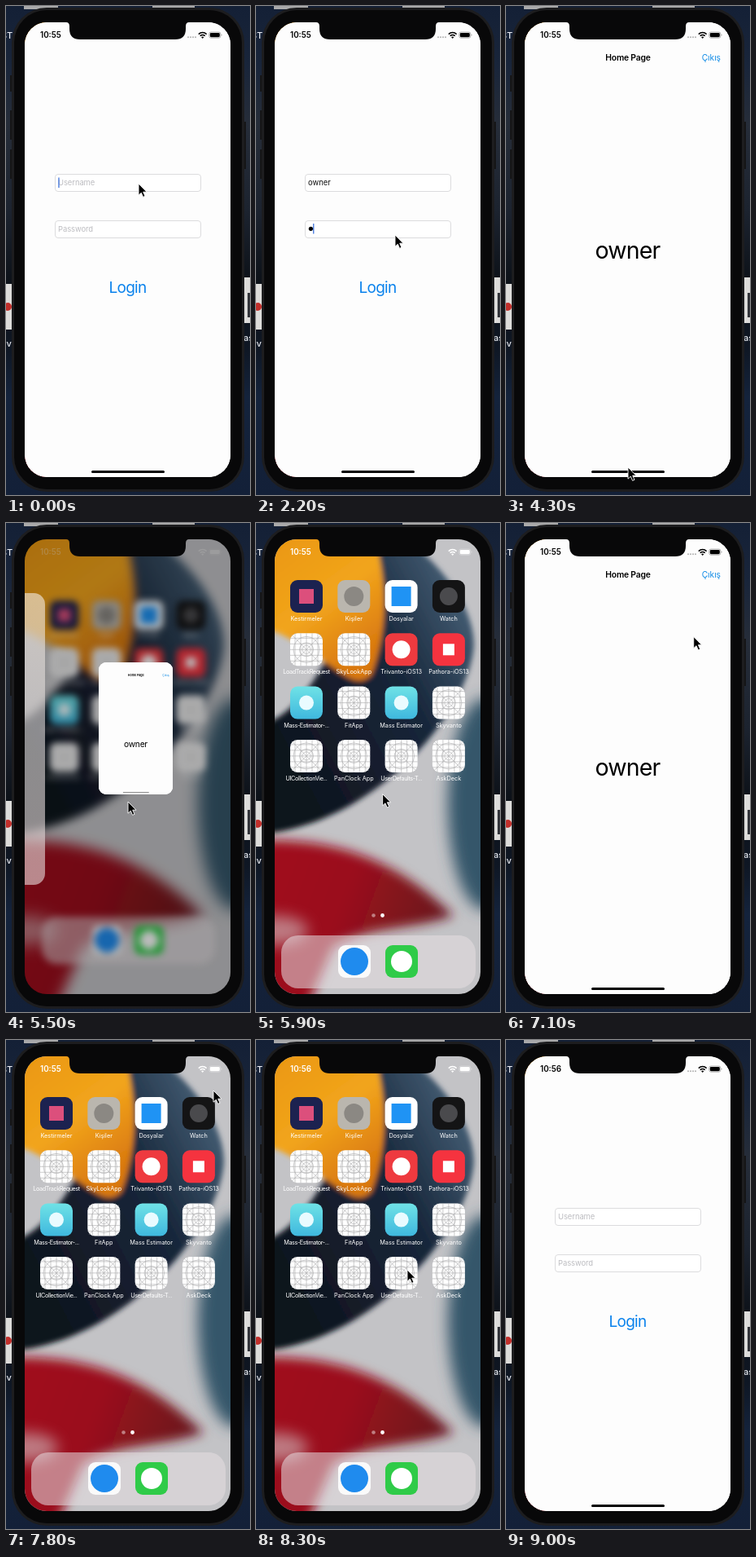
Animation, 300 px wide and 600 px high, one loop 9.5 s. Source, as an HTML page:

```html
<!DOCTYPE html>
<html lang="en">
<head>
<meta charset="utf-8">
<title>Login demo</title>
<style>
  html, body { margin: 0; width: 100%; height: 100%; overflow: hidden; background: #131d30; }
  #stage { position: relative; width: 300px; height: 600px; overflow: hidden; }
  #stage svg { position: absolute; left: 0; top: 0; display: block; }
  #screen { position: absolute; inset: 0; clip-path: inset(20px 24px 22px 23px round 27px); background: #000; }
  #icons { transform-origin: 150px 300px; }
  #dim { position: absolute; inset: 0; background: #000; }
  #prev { position: absolute; top: 86px; width: 164px; height: 358px; border-radius: 14px;
    background: linear-gradient(#f1e9e1, #dcd8d8 45%, #e4d6d6); }
  #app { position: absolute; overflow: hidden; background: #fdfdfd; }
  #app svg { width: 100%; }
  #bar { position: absolute; left: 50%; transform: translateX(-50%); border-radius: 9px; }
  text { font-family: Inter, "Open Sans", sans-serif; white-space: pre; }
  .clock { font-size: 9.8px; font-weight: 600; }
  .label { font-size: 7.3px; fill: #fff; text-anchor: middle; }
  .field { fill: #fff; stroke: #dcdcde; }
  .hint { font-size: 9.45px; fill: #bdbdc1; letter-spacing: -.08px; }
  .typed { font-size: 9.45px; fill: #111; }
  .caret { fill: #3f74dc; }
  .desk { font-size: 11px; font-weight: 500; fill: #e8eaf0; }
</style>
</head>
<body>
<div id="stage">
  <svg id="desk" width="300" height="600">
    <defs>
      <linearGradient id="night" x2="0" y2="1">
        <stop offset="0" stop-color="#142036"/><stop offset=".12" stop-color="#19253a"/>
        <stop offset=".24" stop-color="#262d39"/><stop offset=".42" stop-color="#1c232f"/>
        <stop offset=".56" stop-color="#0d1219"/><stop offset=".7" stop-color="#0f1724"/>
        <stop offset=".8" stop-color="#14233c"/><stop offset="1" stop-color="#132038"/>
      </linearGradient>
    </defs>
    <rect width="300" height="600" fill="url(#night)"/>
    <path d="M22 0h42v4h-42zM180 0h52v4h-52z" fill="#a9a9aa"/>
    <path d="M0 341h8v56h-8zM292 333h8v56h-8z" fill="#dddcda"/>
    <circle cx="2" cy="369" r="5" fill="#c22f2b"/>
    <rect x="297" y="352" width="4" height="30" fill="#33353a"/>
    <text class="desk" x="-6" y="40">ST</text>
    <text class="desk" x="-6" y="418">ov</text>
    <text class="desk" x="292" y="411">as</text>
    <path d="M5 85h4v20h-4zM5 128h4v36h-4zM5 176h4v36h-4zM291 142h4v58h-4z" fill="#151516"/>
    <rect x="7" y="2" width="286" height="594" rx="43" fill="#1d1d1f"/>
    <rect x="10" y="5" width="280" height="588" rx="40" fill="#080809"/>
  </svg>

  <div id="screen">
    <svg id="wall" width="300" height="600">
      <defs>
        <linearGradient id="sun" x2=".6" y2="1">
          <stop offset="0" stop-color="#e8930c"/><stop offset=".6" stop-color="#f2a51c"/><stop offset="1" stop-color="#d9780f"/>
        </linearGradient>
        <linearGradient id="navy" x1=".2" y1=".8" x2="1" y2=".2">
          <stop offset="0" stop-color="#10151f"/><stop offset=".55" stop-color="#17263a"/><stop offset="1" stop-color="#4a657c"/>
        </linearGradient>
        <linearGradient id="red" x2="1" y2=".3">
          <stop offset="0" stop-color="#a30f1b"/><stop offset=".55" stop-color="#9a101c"/><stop offset="1" stop-color="#6a1620"/>
        </linearGradient>
        <linearGradient id="tile" x2="0" y2="1">
          <stop offset="0" stop-color="#6fe2e6"/><stop offset="1" stop-color="#3fb8de"/>
        </linearGradient>
        <filter id="soft" x="-60%" y="-50%" width="220%" height="200%"><feGaussianBlur stdDeviation="9"/></filter>
        <filter id="edge"><feGaussianBlur stdDeviation="3"/></filter>
        <filter id="haze"><feGaussianBlur stdDeviation="7"/></filter>
      </defs>
      <rect x="-30" y="-30" width="360" height="660" fill="#c3c3c6"/>
      <ellipse cx="282" cy="345" rx="46" ry="130" fill="#36566a" filter="url(#soft)"/>
      <g filter="url(#edge)">
        <path d="M0 250C70 235 125 110 135 0H150C205 25 268 90 268 150C262 235 140 375 0 382Z" fill="url(#navy)"/>
        <path d="M0 0H140C162 60 164 130 142 186C115 215 85 150 0 125Z" fill="url(#sun)"/>
      </g>
      <path d="M-20 391C90 382 170 410 243 482C190 500 140 494 95 520L60 600H-20Z" fill="url(#red)" filter="url(#haze)"/>
      <ellipse cx="24" cy="500" rx="40" ry="18" fill="#d3c3c6" opacity=".6" filter="url(#soft)"/>
    </svg>
    <svg id="icons" width="300" height="600"></svg>
    <svg id="homeStatus" width="300" height="600"></svg>
    <div id="dim"></div>
    <div id="prev"></div>
    <div id="app">
      <svg id="login" viewBox="23 20 253 558"></svg>
      <svg id="page" viewBox="23 20 253 558"></svg>
      <svg id="appStatus" viewBox="23 20 253 558"></svg>
      <div id="bar"></div>
    </div>
  </div>

  <svg width="300" height="600">
    <path d="M74 18V20Q78 20 78 25V28Q78 41 91 41H208Q221 41 221 28V25Q221 20 225 20V18Z" fill="#080809"/>
    <path id="cursor" d="M0 0V14.2L3.3 11.2L5.6 16.4L8 15.3L5.7 10.2H10Z" fill="#000" stroke="#fff" stroke-width=".9"/>
  </svg>
</div>

<script>
const LOOP = 9500, STEP = 100, USER = 'owner';
const $ = id => document.getElementById(id);
const clamp = v => Math.min(1, Math.max(0, v));
const mix = (a, b, p) => a + (b - a) * p;
const smooth = u => u * u * (3 - 2 * u);
const easeOut = u => 1 - (1 - u) ** 3;
const span = (t, from, ms) => clamp((t - from) / ms);

// Values of a track of [ms, ...values] rows at time t.
function track(rows, t, ease = u => u) {
  const i = rows.findIndex(r => r[0] > t);
  if (i < 0) return rows.at(-1).slice(1);
  if (i === 0) return rows[0].slice(1);
  const [a, b] = [rows[i - 1], rows[i]];
  const u = ease((t - a[0]) / (b[0] - a[0]));
  return a.slice(1).map((v, k) => mix(v, b[k + 1], u));
}

// --- Static drawing ---

const status = (color, dots) => `<g fill="${color}">
  <text class="clock" x="42" y="39.4"></text>
  ${dots ? [224, 227, 230, 233].map(x => `<circle cx="${x}" cy="38.3" r="1" opacity=".3"/>`).join('') : ''}
  <g fill="none" stroke="${color}" stroke-width="1.5">
    <path d="M236.8 34.6a7 7 0 0 1 9.8 0M238.7 36.8a4.3 4.3 0 0 1 6 0"/>
  </g>
  <path d="M241.7 40l-1.6-1.8a2.3 2.3 0 0 1 3.2 0z"/>
  <rect x="249.8" y="32" width="14" height="7.2" rx="2.2" fill="none" stroke="${color}" stroke-width=".6" opacity=".5"/>
  <rect x="250.8" y="33" width="12" height="5.2" rx="1.4"/>
  <path d="M264.8 34.3q1.3 1.3 0 2.6z" opacity=".6"/></g>`;

function blueprint() {
  const lines = [6, 13, 20, 27, 34].map(k => `M${k} 0V40M0 ${k}H40`).join('');
  const rings = [5, 8.5, 16].map(r => `<circle cx="20" cy="20" r="${r}"/>`).join('');
  return `<g fill="none" stroke="#a8a8aa" stroke-width=".6"><path d="${lines}M2 2L38 38M38 2L2 38"/>${rings}</g>`;
}

const dot = (color, r) => `<circle cx="20" cy="20" r="${r}" fill="${color}"/>`;
const box = (color, s) => `<rect x="${20 - s / 2}" y="${20 - s / 2}" width="${s}" height="${s}" fill="${color}"/>`;
const icon = (cx, cy, tile, art, label = '') => `<g transform="translate(${cx - 20} ${cy - 20})">
  <rect width="40" height="40" rx="9" fill="${tile}"/>${art}
  <text class="label" x="20" y="50" letter-spacing="${label.length > 14 ? -.45 : 0}">${label}</text></g>`;

const grid = blueprint();
const apps = [
  ['Kestirmeler', '#1c2250', box('#dc4f7c', 18)],
  ['Kişiler', '#bab6ae', dot('#8b8883', 12)],
  ['Dosyalar', '#fff', box('#1f93f4', 24)],
  ['Watch', '#141415', dot('#4a4a4d', 11)],
  ['LoadTrackRequest', '#fff', grid],
  ['SkyLookApp', '#fff', grid],
  ['Trivanto-iOS13', '#ee3a3f', dot('#fff', 11)],
  ['Pathora-iOS13', '#f5333f', box('#fff', 14)],
  ['Mass-Estimator-...', 'url(#tile)', dot('#e9fbff', 9)],
  ['FitApp', '#fff', grid],
  ['Mass Estimator', 'url(#tile)', dot('#e9fbff', 9)],
  ['Skyvanto', '#fff', grid],
  ['UICollectionVie...', '#fff', grid],
  ['PanClock App', '#fff', grid],
  ['UserDefaults-T...', '#fff', grid],
  ['AskDeck', '#fff', grid],
];

$('icons').innerHTML =
  apps.map(([label, tile, art], i) =>
    icon(62 + 58.3 * (i % 4), 90 + 65.3 * (i >> 2), tile, art, label)).join('') +
  `<g id="pager" fill="#fff"><circle cx="144.5" cy="481.5" r="2.3" opacity=".45"/><circle cx="155.5" cy="481.5" r="2.4"/></g>
   <rect x="31" y="506" width="239" height="65" rx="21" fill="#e6dfe2" opacity=".55"/>` +
  icon(121, 538, '#fafafa', dot('#1f8bee', 17)) +
  icon(179, 538, '#2fcb48', dot('#fff', 13));

$('homeStatus').innerHTML = status('#fff', false);
$('appStatus').innerHTML = status('#000', true);

$('login').innerHTML = `<rect x="23" y="20" width="253" height="558" fill="#fdfdfd"/>
  <rect class="field" x="60.5" y="206.5" width="179" height="21" rx="3.5"/>
  <rect class="field" x="60.5" y="263.5" width="179" height="21" rx="3.5"/>
  <text class="hint" id="userHint" x="64" y="220.4">Username</text>
  <text class="hint" id="passHint" x="64" y="277.2">Password</text>
  <text class="typed" id="user" x="64" y="220.4"></text>
  <g id="dots">${[0, 1, 2, 3, 4].map(i => `<circle cx="${67.4 + 5.8 * i}" cy="273.3" r="2.6"/>`).join('')}</g>
  <rect class="caret" id="caret" width="1.3" height="12.5"/>
  <text id="button" x="149.5" y="352.3" font-size="19" letter-spacing="-.75" text-anchor="middle" fill="#0a82ec">Login</text>`;

$('page').innerHTML = `<rect x="23" y="20" width="253" height="558" fill="#fdfdfd"/>
  <text x="150" y="67.4" font-size="10.3" font-weight="600" letter-spacing="-.18" text-anchor="middle">Home Page</text>
  <text x="264" y="67.4" font-size="10.2" text-anchor="end" fill="#0f8be6">Çıkış</text>
  <text x="149.5" y="309.5" font-size="28.5" letter-spacing="-.8" text-anchor="middle">${USER}</text>`;

const clocks = document.querySelectorAll('.clock');
const dots = [...$('dots').children];

// --- Motion ---

const pointer = [
  [1200, 163, 218], [1700, 171, 281], [2800, 171, 281], [3200, 148, 344], [3800, 148, 344],
  [4300, 150, 566], [4900, 150, 566], [5400, 150, 342], [5800, 150, 342], [6200, 186, 282],
  [6800, 186, 282], [7300, 255, 62], [7800, 255, 62], [8200, 186, 282],
];
// Card while swiped away: centre x, centre y, width, height
const swipe = [
  [4900, 149.5, 299, 253, 558], [5100, 150, 268, 200, 440], [5300, 152, 214, 143, 312],
  [5400, 155, 228, 115, 222], [5500, 159.5, 252, 91, 162], [5600, 171, 275, 62, 88],
  [5700, 178, 285, 44, 46], [5800, 179, 286, 40, 40],
];
// Backdrop while swiping: blur, scale, shade, status opacity
const backdrop = [[4900, 8, .84, .42, 0], [5400, 5.5, .88, .31, .2], [5500, 4.8, .89, .27, .3], [5800, 0, 1, 0, 1]];
// Neighbour card: right edge, opacity
const neighbour = [[5000, 10, .9], [5350, 48, .9], [5500, 48, .62], [5700, 40, 0]];
const userKeys = [400, 600, 700, 900, 1100], passKeys = [2100, 2400, 2500, 2600, 2800];

const fromIcon = p => [mix(179, 149.5, p), mix(286, 299, p), mix(40, 253, p), 40 + 518 * p ** 1.4];

// How far the app is open: 0 is its icon, 1 is full screen
function openness(t) {
  if (t < 6300) return t < 5800 ? 1 : 0;
  if (t < 7400) return easeOut(span(t, 6300, 400));
  if (t < 8300) return 1 - easeOut(span(t, 7400, 400));
  return easeOut(span(t, 8300, 400));
}

function drawForm(t) {
  const fresh = t >= 8300;
  const count = keys => fresh ? 0 : keys.filter(k => t >= k).length;
  const letters = count(userKeys), secret = count(passKeys);
  $('user').textContent = USER.slice(0, letters);
  $('userHint').style.opacity = letters ? 0 : 1;
  $('passHint').style.opacity = secret ? 0 : 1;
  dots.forEach((d, i) => d.style.opacity = i < secret ? 1 : 0);
  const inPass = t >= 1700;
  const typed = letters ? $('user').getComputedTextLength() : 0;
  $('caret').setAttribute('x', 64.3 + (inPass ? 5.8 * secret : typed));
  $('caret').setAttribute('y', inPass ? 267 : 210.5);
  $('caret').style.opacity = fresh ? 0 : 1;
  $('button').style.opacity = t >= 3300 && t < 3400 ? .35 : 1;
}

function drawApp(t, swiping) {
  const p = openness(t);
  const [cx, cy, w, h] = swiping ? track(swipe, t) : fromIcon(p);
  const s = w / 253, grow = (w - 40) / 213, full = s > .995;
  Object.assign($('app').style, {
    left: cx - w / 2 + 'px', top: cy - h / 2 + 'px', width: w + 'px', height: h + 'px',
    borderRadius: mix(4, 27, grow) + 'px', opacity: clamp(grow * 7),
  });
  Object.assign($('bar').style, {
    width: 90 * s + 'px', height: 3 * s + 'px', bottom: 5.5 * s + 'px', background: full ? '#000' : '#8c8c8c',
  });
  $('appStatus').style.opacity = swiping ? clamp(1 - (t - 4900) / 300) : 1;
  const rise = 558 * (1 - easeOut(span(t, 3300, 500)));
  $('page').style.display = t >= 3400 && t < 8300 ? '' : 'none';
  $('page').style.transform = `translateY(${rise}px)`;
  return p;
}

function drawHome(t, swiping, p) {
  const [blur, scale, shade, bright] = swiping
    ? track(backdrop, t) : [3.6 * p, 1 - .035 * p, .06 * p, 1 - .45 * p];
  const filter = blur > .05 ? `blur(${blur}px)` : 'none';
  $('wall').style.filter = filter;
  $('icons').style.filter = filter;
  $('icons').style.transform = `scale(${scale})`;
  $('pager').style.opacity = clamp(1 - blur / 2);
  $('homeStatus').style.opacity = bright;
  $('dim').style.opacity = shade;
  const [right, alpha] = track(neighbour, t);
  $('prev').style.left = right - 164 + 'px';
  $('prev').style.opacity = swiping ? alpha : 0;
}

function draw(t) {
  const swiping = t >= 4900 && t < 5800;
  drawForm(t);
  drawHome(t, swiping, drawApp(t, swiping));
  clocks.forEach(c => c.textContent = t < 8300 ? '10:55' : '10:56');
  const [x, y] = track(pointer, t, smooth);
  $('cursor').setAttribute('transform', `translate(${x} ${y})`);
  $('cursor').style.opacity = t < 8900 ? 1 : 0;
}

const start = performance.now();
function tick() {
  const t = (performance.now() - start) % LOOP;
  draw(Math.floor(t / STEP) * STEP);
  requestAnimationFrame(tick);
}
tick();
</script>
</body>
</html>
```
